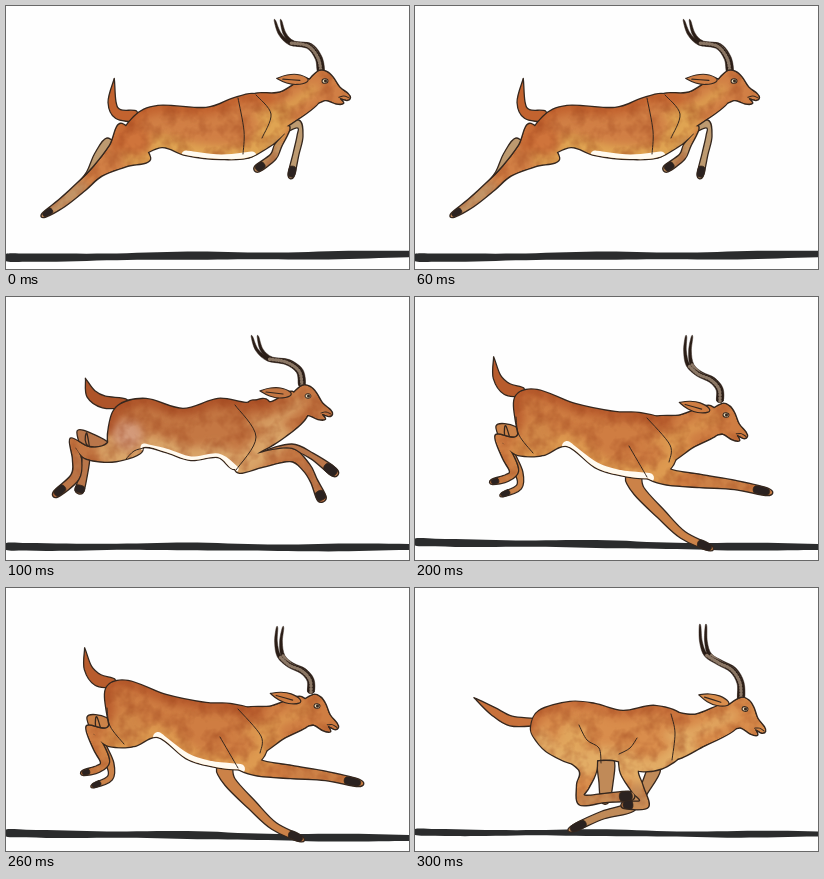
Animation, 403 px wide and 263 px high, one loop 0.4 s. Source, as an HTML page:

```html
<!DOCTYPE html>
<html lang="en">
<head>
<meta charset="utf-8">
<title>Leaping antelope</title>
<style>
  html, body { margin: 0; width: 100%; height: 100%; overflow: hidden; background: #fefefe; }
  svg { display: block; width: 100%; height: 100%; }
  path { stroke-linejoin: round; stroke-linecap: round; }
</style>
</head>
<body>
<svg id="stage" viewBox="0 0 403 263"></svg>
<script>
const INK = '#35271e', HOOF = '#2b2220', CREAM = '#fffaf0';
const FRAME_MS = 100;

const parse = text => text.split(' ').map(p => p.split(',').map(Number));
const mix = (a, b, t) => a.map((v, k) => v + (b[k] - v) * t);

// Catmull-Rom curve through key points, as path data.
function spline(pts, closed = false) {
  const n = pts.length;
  const at = i => pts[closed ? (i + n) % n : Math.max(0, Math.min(n - 1, i))];
  const xy = p => p.slice(0, 2).map(v => v.toFixed(2));
  const lean = (p, from, to) => p.map((v, k) => v + (to[k] - from[k]) / 6);
  let d = `M${xy(pts[0])}`;
  for (let i = 0; i < (closed ? n : n - 1); i++) {
    const [a, b, c, e] = [at(i - 1), at(i), at(i + 1), at(i + 2)];
    d += `C${xy(lean(b, a, c))} ${xy(lean(c, e, b))} ${xy(c)}`;
  }
  return d + (closed ? 'Z' : '');
}

// Outline of a limb whose joints are [x, y, radius].
function ribbon(joints) {
  const side = sign => joints.map(([x, y, r], i) => {
    const from = joints[Math.max(0, i - 1)], to = joints[Math.min(joints.length - 1, i + 1)];
    const dx = to[0] - from[0], dy = to[1] - from[1], k = sign * r / Math.hypot(dx, dy);
    return [x - dy * k, y + dx * k];
  });
  return spline([...side(1), ...side(-1).reverse()], true);
}

const fill = (d, color, outline = 1.3) =>
  `<path d="${d}" fill="${color}" stroke="${INK}" stroke-width="${outline}"/>`;
const line = (pts, color = INK, width = 1, dash = 'none') =>
  `<path d="${spline(pts)}" fill="none" stroke="${color}" stroke-width="${width}" stroke-dasharray="${dash}"/>`;

function hoof(joints) {
  const [ankle, toe] = joints.slice(-2);
  return fill(ribbon([mix(ankle, toe, .6), toe]), HOOF, .8);
}

// The two horns share a root and drift apart towards the tips.
function horns(pts) {
  const last = pts.length - 1;
  return [6, 0].map(spread => {
    const curve = pts.map(([x, y], i) => [x + spread * i / last, y, 3.2 - 2.4 * (i / last) ** 1.5]);
    return fill(ribbon(curve), '#2a1d16', .5) + line(curve.slice(0, -2), '#8b7765', 3.4, '.5 2.4');
  }).join('');
}

function ground([left, right, thickness]) {
  const pts = Array.from({ length: 22 }, (_, i) => {
    const t = i / 20;
    return [t * 403, left + (right - left) * t + .5 * Math.sin(t * 11), thickness / 2 + .4 * Math.sin(t * 17)];
  });
  return fill(ribbon(pts), '#2b2c2d', 0);
}

const HEAD = spline(parse('-17,1 -6,-10 2,-9 8,-3 14,7 22,14 24,18 21,20 14,18 17,23 10,23 0,19 -9,21 -16,14'), true);
const EAR = ribbon(parse('-18,-2,2 -28,-3,5 -38,-4,4 -47,-5,.5'));

function antelope(p, i) {
  const [back, belly, neck, tail, horn] = [p.back, p.belly, p.neck, p.tail, p.horn].map(parse);
  const near = p.near.map(parse), far = p.far.map(parse);
  const place = `transform="translate(${p.head[0]} ${p.head[1]}) rotate(${p.head[2]})"`;
  const parts = [spline([...back, ...belly], true), ribbon(neck), ...near.map(ribbon)]
    .map(d => `<path d="${d}"/>`).join('') + `<path d="${HEAD}" ${place}/>`;
  const [base, dark, light, hip, shin] = p.colors;
  const haunch = near[0][0];

  // Outlining every part before filling any leaves one contour around them all.
  return `<g class="pose">
    ${ground(p.ground)}
    ${far.map(leg => fill(ribbon(leg), shin) + hoof(leg)).join('')}
    ${fill(ribbon(tail), dark)}
    ${horns(horn)}
    <g stroke="${INK}" stroke-width="2.6">${parts}</g>
    <clipPath id="hide${i}">${parts}</clipPath>
    <g clip-path="url(#hide${i})">
      <g filter="url(#paint)">
        <g fill="${base}">${parts}</g>
        <g filter="url(#soft)">
          ${line(belly, light, 26)}
          ${line(back, dark, 15)}
          ${line(neck, light, 8)}
          <circle cx="${haunch[0]}" cy="${haunch[1]}" r="15" fill="${hip}"/>
          ${near.map(leg => line(leg.slice(-3), shin, 10)).join('')}
        </g>
      </g>
      ${line(belly.slice(2, -2), CREAM, p.cream)}
    </g>
    ${near.map(hoof).join('')}
    ${p.folds.map(f => line(parse(f))).join('')}
    <g ${place}>
      ${fill(EAR, base, 1.2)}
      ${line(parse('-25,-2 -42,-4'), INK, 1.2)}
      ${line(parse('23,18 18,16 13,17'))}
      <ellipse rx="3" ry="2.3" fill="#ead9b8" stroke="${INK}"/>
      <circle cx=".5" r="1.5" fill="${INK}"/>
    </g>
  </g>`;
}

// head: eye x, eye y, tilt; ground: left y, right y, thickness; colors: base, dark, light, hip, shin
const poses = [
  {
    colors: ['#d17f45', '#c2632f', '#dfa452', '#cf743b', '#bd9a70'], cream: 9,
    ground: [251.5, 248.5, 7.5], head: [319, 75, -3],
    back: '112,138 128,111 152,100 200,102 226,93 246,88 264,93',
    belly: '272,112 262,130 246,150 215,153 180,149 156,141 130,150',
    neck: '252,110,20 281,101,16 308,83,12',
    tail: '130,110,5 112,108,5 106,96,4 108,75,.5',
    horn: '315,66 312,52 302,40 284,37 274,28 269,15',
    near: ['130,135,22 112,150,13 92,165,6 76,180,5 56,197,4 38,209,2',
           '240,147,5 262,134,6 281,124,4 272,140,3 267,151,3 251,163,3'],
    far: ['108,150,8 101,138,6 93,150,5 84,168,4 70,184,3 62,189,2',
          '272,124,5 292,118,4 294,130,3 290,148,3 285,170,3'],
    folds: ['232,92 238,125 237,148', '250,89 265,108 256,132'],
  },
  {
    colors: ['#c47743', '#ae5429', '#d9a468', '#d39a7a', '#b9764a'], cream: 7,
    ground: [249.5, 250.5, 7], head: [302, 99, 0],
    back: '103,130 112,109 140,102 177,112 212,102 240,106 262,104',
    belly: '272,140 252,156 229,172 212,160 185,163 160,155 138,150 118,161 104,152',
    neck: '248,128,22 274,121,18 294,105,13',
    tail: '120,106,4 98,105,6 85,97,5 80,83,.5',
    horn: '296,88 293,74 280,65 262,62 251,53 246,40',
    near: ['122,138,20 106,155,10 82,156,6 67,146,5 71,162,4 69,180,4 50,197,3',
           '232,171,5 255,163,7 285,158,6 300,170,4 308,184,3 316,202,4'],
    far: ['100,155,8 84,142,6 76,135,5 80,158,4 77,180,4 73,195,4',
          '258,160,5 286,151,4 306,159,3 329,176,4'],
    folds: ['229,108 250,140 230,173', '138,151 128,154 120,162'],
  },
  {
    colors: ['#cf7d42', '#b85c2d', '#dd9a50', '#d08747', '#cb8248'], cream: 10,
    ground: [245, 250.5, 7], head: [311, 118, 9],
    back: '101,124 101,99 122,93 160,107 200,115 224,116 250,124',
    belly: '262,150 255,172 234,181 205,178 180,170 152,149 128,158 110,154',
    neck: '240,145,22 272,134,17 301,121,13',
    tail: '108,95,4 92,92,6 82,80,4 79,62,.5',
    horn: '305,104 304,92 296,83 283,77 273,68 270,54 271,40',
    near: ['122,138,19 102,149,9 84,142,5 92,158,5 99,174,4 92,181,3 77,185,2',
           '235,165,13 250,179,8 285,184,6 320,188,4 353,195,3'],
    far: ['102,148,8 95,134,7 86,129,5 95,155,4 104,176,4 104,190,3 87,198,2',
          '218,178,8 224,194,6 246,217,5 268,238,4 295,251,3'],
    folds: ['232,121 255,148 254,165', '214,149 232,180', '101,120 104,138 118,156'],
  },
  {
    colors: ['#d98d4c', '#c8713b', '#e2ac65', '#e0a55c', '#c08a58'], cream: 0,
    ground: [244, 246.5, 6], head: [330, 121, 11],
    back: '116,140 124,123 155,114 180,116 208,123 240,118 268,129',
    belly: '270,160 252,178 226,183 203,173 184,172 160,176 134,165 121,152',
    neck: '252,148,22 285,142,16 318,127,12',
    tail: '122,134,3 96,133,5 78,123,4 61,111,.5',
    horn: '326,112 325,95 317,82 304,75 291,67 286,54 285,38',
    near: ['158,150,20 173,180,9 168,198,6 167,212,5 190,210,4 216,208,4',
           '222,165,15 214,182,9 222,200,6 229,216,5 209,217,3'],
    far: ['191,172,8 191,195,7 190,214,4',
          '240,180,6 230,200,5 216,219,5 188,227,4 157,241,3'],
    folds: ['164,137 172,152 184,160 186,175', '256,126 260,145 257,172', '222,150 215,160 204,166'],
  },
];

document.getElementById('stage').innerHTML = `
  <defs>
    <filter id="soft" x="-50%" y="-50%" width="200%" height="200%" color-interpolation-filters="sRGB">
      <feGaussianBlur stdDeviation="4"/>
    </filter>
    <filter id="paint" color-interpolation-filters="sRGB">
      <feTurbulence type="fractalNoise" baseFrequency=".07" numOctaves="3" seed="4"/>
      <feColorMatrix values="0 0 0 0 .6  0 0 0 0 .25  0 0 0 0 .1  1 0 0 0 -.4"/>
      <feComposite operator="in" in2="SourceAlpha" result="mottle"/>
      <feMerge><feMergeNode in="SourceGraphic"/><feMergeNode in="mottle"/></feMerge>
    </filter>
  </defs>
  ${poses.map(antelope).join('')}`;

const groups = document.querySelectorAll('.pose');
const start = performance.now();
function draw() {
  const current = Math.floor((performance.now() - start) / FRAME_MS) % groups.length;
  groups.forEach((g, i) => { g.style.display = i === current ? '' : 'none'; });
  requestAnimationFrame(draw);
}
draw();
</script>
</body>
</html>
```
